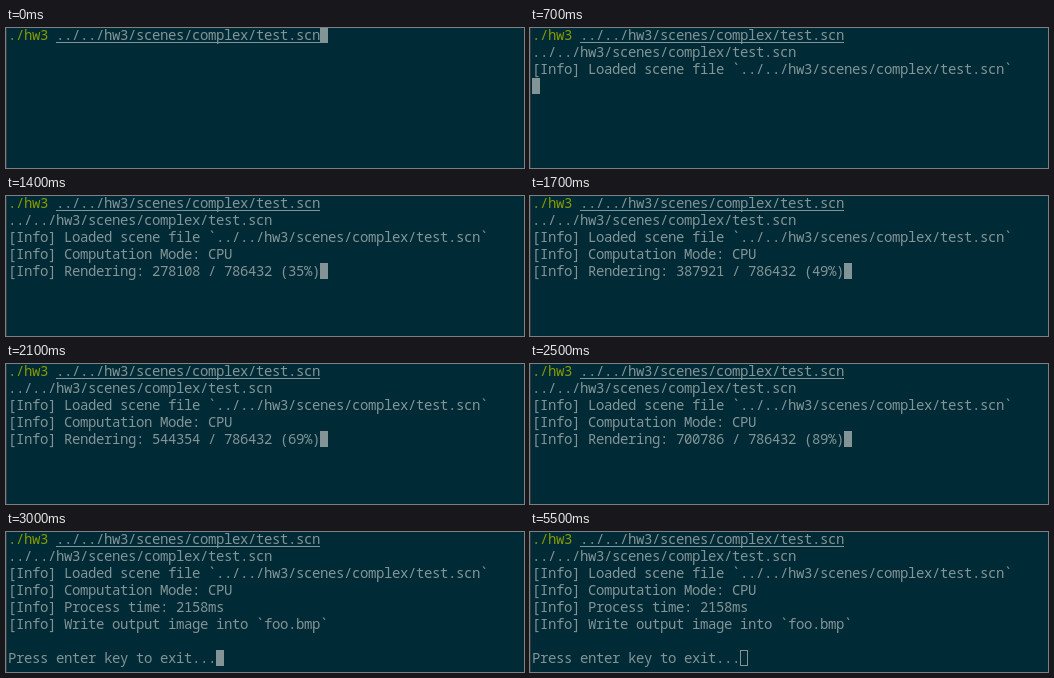
An HTML page for the animation above (6400 ms loop, 518 px wide and 140 px high).

```html
<!DOCTYPE html>
<html lang="en">
<head>
<meta charset="utf-8">
<title>Terminal render</title>
<style>
  html, body { margin: 0; width: 100%; height: 100%; overflow: hidden; background: #002b36; }
  svg { display: block; width: 518px; height: 140px; }
  text {
    font: 14px "Noto Sans Mono", "DejaVu Sans Mono", monospace;
    font-stretch: 87.5%;
    font-variant-ligatures: none;
    letter-spacing: -0.4px;
    white-space: pre;
    fill: #839496;
  }
</style>
</head>
<body>
<svg id="stage" viewBox="0 0 518 140">
  <rect width="518" height="140" fill="#002b36"/>
  <rect width="1" height="140" fill="#303a3c"/>
  <rect x="50" y="14" width="264" height="1" fill="#839496"/>
  <rect id="cursor" stroke="#839496"/>
</svg>
<script>
const LOOP = 6400, STEP = 100;
const LEFT = 2, CELL = 8, ROW = 17, BASELINE = 12;
const TOTAL = 786432;
const PATH = "../../hw3/scenes/complex/test.scn";
const COMMAND = "./hw3 " + PATH;

// Pixels rendered at points in time; linear in between.
const PROGRESS = [[700, 21880], [1000, 131691], [1700, 387921], [2500, 700786], [2719, TOTAL]];

const stage = document.getElementById("stage");
const cursor = document.getElementById("cursor");

function addText(row) {
  const text = document.createElementNS("http://www.w3.org/2000/svg", "text");
  text.setAttribute("x", LEFT);
  text.setAttribute("y", BASELINE + row * ROW);
  return stage.appendChild(text);
}

const rows = Array.from({ length: 8 }, (_, row) => addText(row));
const program = addText(0);
program.textContent = "./hw3";
program.style.fill = "#859900";

function rendered(time) {
  for (let i = 1; i < PROGRESS.length; i++) {
    const [t0, n0] = PROGRESS[i - 1], [t1, n1] = PROGRESS[i];
    if (time <= t1) return Math.round(n0 + (n1 - n0) * (time - t0) / (t1 - t0));
  }
  return TOTAL;
}

function screen(time) {
  const lines = [COMMAND];
  if (time < 700) return lines;
  lines.push(PATH, "[Info] Loaded scene file `" + PATH + "`");
  if (time < 800) return [...lines, ""];
  lines.push("[Info] Computation Mode: CPU");
  if (time < 2900) {
    const count = rendered(time);
    const percent = Math.round(100 * count / TOTAL);
    return [...lines, `[Info] Rendering: ${count} / ${TOTAL} (${percent}%)`];
  }
  lines.push("[Info] Process time: 2158ms");
  if (time < 3000) return [...lines, ""];
  return [...lines, "[Info] Write output image into `foo.bmp`", "", "Press enter key to exit..."];
}

function placeCursor(column, row, hollow) {
  const attrs = {
    x: LEFT + column * CELL + 0.5,
    y: row * ROW - 0.5,
    width: CELL - 1,
    height: ROW - 2,
    fill: hollow ? "none" : "#839496"
  };
  for (const name in attrs) cursor.setAttribute(name, attrs[name]);
}

function draw(time) {
  const lines = screen(Math.floor(time / STEP) * STEP);
  rows.forEach((text, i) => {
    const line = lines[i] || "";
    const shown = i === 0 ? line.replace("./hw3", "     ") : line;
    if (text.textContent !== shown) text.textContent = shown;
  });
  const last = lines.length - 1;
  placeCursor(lines[last].length, last, time >= 5500);
}

const start = performance.now();
function tick() {
  draw((performance.now() - start) % LOOP);
  requestAnimationFrame(tick);
}
tick();
</script>
</body>
</html>
```
